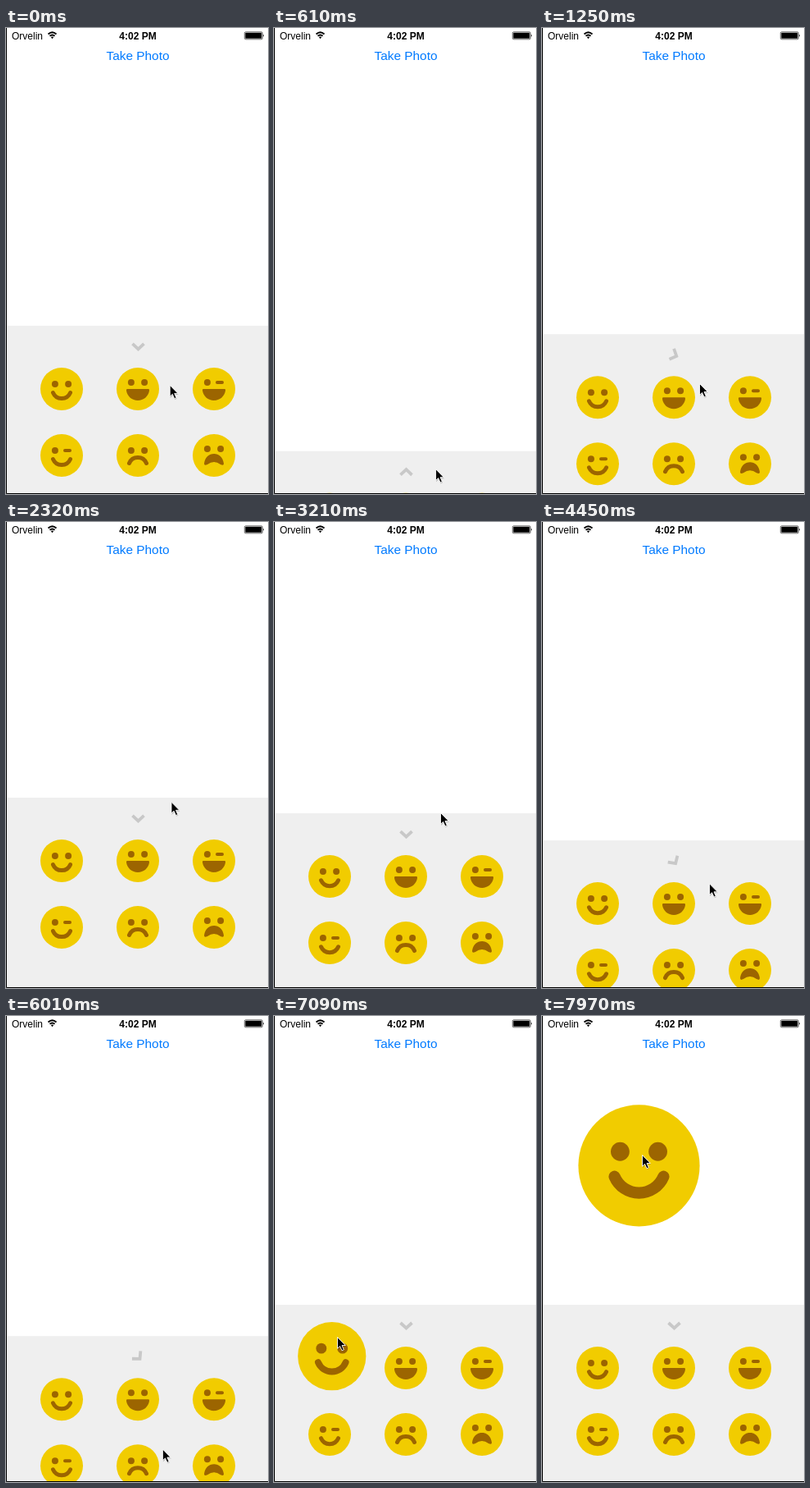
An HTML page for the animation above (8000 ms loop, 320 px wide and 568 px high).

```html
<!DOCTYPE html>
<html lang="en">
<head>
<meta charset="utf-8">
<title>Sticker drawer</title>
<style>
  html, body { margin: 0; width: 100%; height: 100%; overflow: hidden; background: #fff; }
  svg { display: block; width: 100%; height: 100%; }
  text { font-family: "Liberation Sans", Arial, sans-serif; font-size: 12px; }
  .skin { fill: #f1cc00; }
  .ink { fill: #9c6500; }
  .line { fill: none; stroke: #9c6500; stroke-width: 5; stroke-linecap: round; }
  .wink { stroke-width: 4; }
</style>
</head>
<body>
<svg viewBox="0 0 320 568">
  <defs>
    <circle id="skin" class="skin" r="26"/>
    <g id="eyes" class="ink"><circle cx="-8.1" r="4"/><circle cx="8.1" r="4"/></g>
    <g id="winking"><circle class="ink" cx="-8.1" r="4"/><path class="line wink" d="M4 0H10"/></g>
    <path id="smile" class="line" d="M-10.5 4.7A11.4 11.4 0 0 0 10.5 4.7"/>
    <path id="frown" class="line" d="M-10.5 9.5A11.4 11.4 0 0 1 10.5 9.5"/>
    <path id="grin" class="ink" d="M-13 0H13Q14.3 0 14 2C13 9 7 14 0 14S-13 9-14 2Q-14.3 0-13 0Z"/>
    <path id="gasp" class="ink" d="M-12 10C-11 2-6-2 0-2S11 2 12 10Q12 13 8 11Q0 5-8 11Q-12 13-12 10Z"/>
  </defs>

  <rect width="320" height="568" fill="#fff"/>
  <text x="7" y="14">Orvelin</text>
  <g fill="none" stroke="#000" stroke-width="1.8">
    <path d="M51.5 7.5Q56.5 3 61.5 7.5M53.5 9.8Q56.5 7.2 59.5 9.8"/>
    <path d="M54.8 11L56.5 13.2 58.2 11Q56.5 9.8 54.8 11Z" fill="#000" stroke="none"/>
  </g>
  <text x="161" y="14" text-anchor="middle" font-weight="bold">4:02 PM</text>
  <rect x="291.300" y="4.800" width="22" height="9" rx="1.500" fill="none" stroke="#000" stroke-width=".6"/>
  <rect x="292.300" y="5.800" width="20" height="7" rx=".6"/>
  <path d="M314.200 7.800Q316 9.300 314.200 10.800Z"/>
  <text x="161" y="39" text-anchor="middle" fill="#007aff" style="font-size:15.4px">Take Photo</text>

  <g id="drawer">
    <rect width="320" height="600" fill="#efefef"/>
    <path id="chevron" d="M-7-3.5L0 3 7-3.5" fill="none" stroke="#c8c8c8" stroke-width="3.8"/>
  </g>
  <g id="held"></g>
  <path d="M.5 0V567.5H320" fill="none" stroke="#000"/>
  <g id="cursor">
    <path d="M1 2V16L4 13 6.5 18 9 17 7 12H11Z" opacity=".2"/>
    <path d="M.5.5V14.3L3.6 11.4 6 16.8 8.3 15.8 6 10.5H10.3Z" stroke="#fff" stroke-width=".9"/>
  </g>
</svg>
<script>
const LOOP = 8000, OPEN = 352, CLOSED = 516, GRAB = 7027, DROP = 7970;
const $ = id => document.getElementById(id);
const mix = (a, b, k) => a + (b - a) * k;
const ease = k => k <= 0 ? 0 : k >= 1 ? 1 : k * k * (3 - 2 * k);

// Remaining distance of a damped spring, from 1 to 0
const spring = (ms, push = .98) =>
  Math.exp(-.0108 * ms) * (Math.cos(.011 * ms) + push * Math.sin(.011 * ms));

const face = (eyes, y, mouth) =>
  `<use href="#skin"/><use href="#${eyes}" y="${y}"/><use href="#${mouth}"/>`;
const faces = [
  face('eyes', -6, 'smile'), face('eyes', -8, 'grin'), face('winking', -8, 'grin'),
  face('winking', -6, 'smile'), face('eyes', -6, 'frown'), face('eyes', -8, 'gasp')
];
$('drawer').insertAdjacentHTML('beforeend', faces.map((f, i) =>
  `<g id="face${i}" transform="translate(${68 + i % 3 * 93} ${77 + (i > 2) * 81})">${f}</g>`).join(''));
$('held').innerHTML = faces[0];

// Pointer strokes: start, end, x, y reached
const strokes = [
  [-160, 690, 197, 540], [840, 1150, 192, 433], [1250, 1710, 201, 421],
  [2070, 2860, 203, 85], [2920, 3210, 203, 354], [3240, 3720, 204, 166],
  [3780, 4500, 204, 444], [4500, 5300, 213, 515], [5540, 5780, 195, 531],
  [5930, 6590, 95, 447], [6790, GRAB, 77, 391], [7100, 7740, 122, 169]
];
const pointer = t => strokes.reduce(([x, y], [start, end, toX, toY]) => {
  const k = ease((t - start) / (end - start));
  return [mix(x, toX, k), mix(y, toY, k)];
}, [200, 424]);

const grips = [
  { from: -160, to: 60, rest: CLOSED },
  { from: 840, to: 1138, rest: OPEN },
  { from: 2070, to: 2920, rest: OPEN },
  { from: 3240, to: 3780, rest: OPEN },
  { from: 4380, to: 4404, rest: CLOSED },
  { from: 5930, to: 5931, rest: OPEN, push: -.11 }
];

// The drawer follows the pointer, resists above OPEN, and springs to rest when let go
function drawer(t, i = grips.findLastIndex(g => g.from <= t)) {
  if (i < 0) return [OPEN, 0];
  const { from, to, rest, push } = grips[i];
  const [base, turn] = drawer(from, i - 1);
  const pulled = base + pointer(Math.min(t, to))[1] - pointer(from)[1];
  const top = pulled < OPEN ? mix(OPEN, pulled, .2) : pulled;
  if (t < to) return [top, turn];
  const left = spring(t - to, push);
  return [mix(rest, top, left), mix(rest === CLOSED ? 180 : 0, turn, left)];
}

const place = (id, x, y, more = '') => $(id).setAttribute('transform', `translate(${x} ${y}) ${more}`);
const show = (id, on) => $(id).setAttribute('visibility', on ? 'visible' : 'hidden');

function draw() {
  const t = performance.now() % LOOP;
  const [x, y] = pointer(t), [top, turn] = drawer(t);
  place('cursor', x, y);
  place('drawer', 0, top);
  place('chevron', 161.5, 25.5, `rotate(${-turn})`);

  const lifted = t >= GRAB, dropped = t >= DROP;
  const size = dropped ? 2.85 : lifted ? 3 - 2 * spring(t - GRAB) : 1;
  place('held', x - 10 / size, y + 38 / size, `scale(${size})`);
  show('held', lifted);
  show('face0', !lifted || dropped);
  requestAnimationFrame(draw);
}
draw();
</script>
</body>
</html>
```
